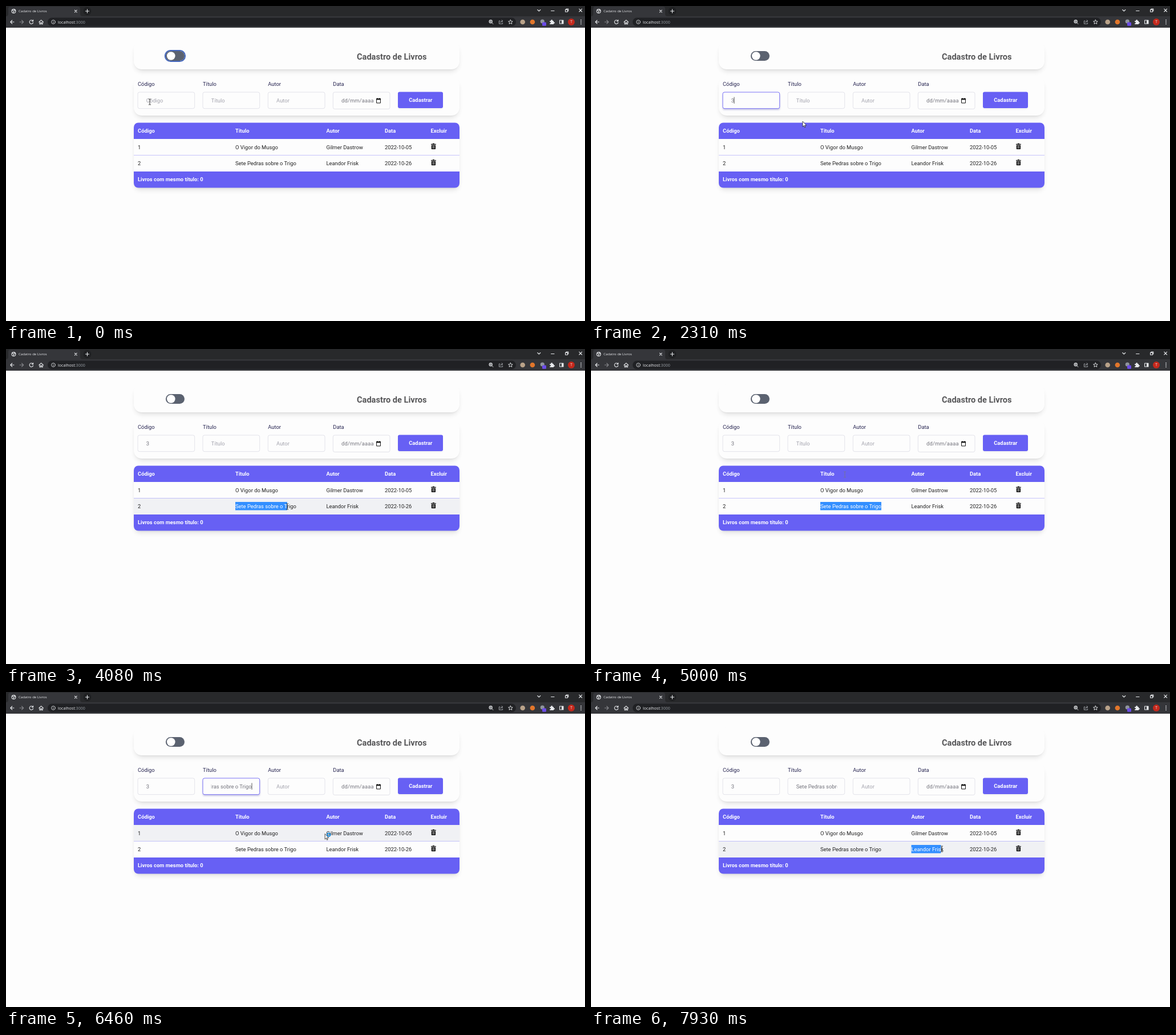
Write an HTML page that moves like this. It is 1015x552 px and loops after 8 s.

```html
<!DOCTYPE html>
<html lang="pt">
<head>
<meta charset="utf-8">
<title>Cadastro de Livros</title>
<style>
html, body { margin: 0; width: 100%; height: 100%; overflow: hidden; background: #fdfdfd; }
svg { display: block; width: 100%; height: 100%; }
text { font: 9.4px Roboto, sans-serif; fill: #222; white-space: pre; }
.ui { font-family: "Open Sans", "Noto Sans", sans-serif; fill: #e8eaed; }
.bold { font-weight: 700; }
.light { fill: #fff; }
.label { fill: #24224f; }
.hint { fill: #a3a3ad; }
.value { fill: #73737c; }
.line { fill: none; stroke: #e8eaed; stroke-width: 1.1; stroke-linecap: round; stroke-linejoin: round; }
.far { filter: blur(4.4px); fill: #000; opacity: .1; }
.near { filter: blur(1.7px); fill: #000; opacity: .05; }
.purple { fill: #6760f4; }
</style>
</head>
<body>
<svg id="stage" viewBox="0 0 1015 552" preserveAspectRatio="none"></svg>
<script>
const LOOP = 8000;
const TICK = 1000 / 13;
const COLS = [231, 402, 561.5, 664, 744.5];
const BOOKS = [
  ['1', 'O Vigor do Musgo', 'Gilmer Dastrow', '2022-10-05'],
  ['2', 'Sete Pedras sobre o Trigo', 'Leandor Frisk', '2022-10-26']
];
const PASTED = BOOKS[1][1];
const FIELDS = [['Código', 231], ['Título', 345], ['Autor', 459.3], ['Data', 573.3]];

const text = (x, y, s, cls = '', extra = '') =>
  `<text x="${x}" y="${y}" class="${cls}" ${extra}>${s}</text>`;
const rect = (x, y, w, h, r, attrs) =>
  `<rect x="${x}" y="${y}" width="${w}" height="${h}" rx="${r}" ${attrs}/>`;
const line = (d, attrs = '') => `<path class="line" d="${d}" ${attrs}/>`;
const dot = (x, y, r, fill) => `<circle cx="${x}" cy="${y}" r="${r}" fill="${fill}"/>`;

const shadow = (x, y, w, h, r) =>
  rect(x + 1.8, y + 7.7, w - 3.6, h - 3.6, r, 'class="far"') +
  rect(x + 1.2, y + 3.5, w - 2.4, h - 2.4, r, 'class="near"');

const card = (y, h) => shadow(224, y, 571, h, 14) + rect(224, y, 571, h, 14, 'fill="#fdfdfd"');

function browser() {
  return rect(0, 0, 1015, 18, 0, 'fill="#28292b"') +
    rect(0, 18, 1015, 20, 0, 'fill="#35363a"') +
    '<path d="M0 18Q4 18 4 14V5Q4 1 8 1H126Q130 1 130 5V14Q130 18 134 18Z" fill="#35363a"/>' +
    '<circle class="line" cx="13.5" cy="9" r="3.4"/>' +
    line('M11 7.4L14 8.4L13 11.6M14.5 6L16 8.5', 'stroke-width=".9"') +
    text(22, 11.3, 'Cadatro de Livros', 'ui', 'style="font-size:6.1px"') +
    line('M120.4 7.2L124.2 11M124.2 7.2L120.4 11') +
    dot(142.5, 9, 7, '#1f2022') +
    line('M139.4 9H145.6M142.5 5.9V12.1') +
    line('M931.8 6.5L934.3 9L936.8 6.5') +
    line('M955.6 8.5H961') +
    line('M980.6 6.4H984.4V10.2H980.6ZM982 6.2V5H985.8V8.8H984.6', 'stroke-width=".9"') +
    line('M1004.8 5.2L1009.6 10M1009.6 5.2L1004.8 10') +
    rect(73, 20.5, 821, 15, 7.5, 'fill="#202124"') +
    line('M14 28H8M10.8 25L7.8 28L10.8 31') +
    line('M24 28H30.4M27.6 25L30.6 28L27.6 31', 'style="stroke:#85868a"') +
    line('M47 26A3.3 3.3 0 1 0 47.6 29M47.6 24.4V26.8H45.2') +
    line('M57.8 28.2L61.6 24.6L65.4 28.2M59 27.4V31.6H60.8V29H62.4V31.6H64.2V27.4') +
    '<circle class="line" cx="83" cy="28" r="3.4" style="stroke-width:.8"/>' +
    line('M83 27.8V29.8M83 26.2V26.3', 'style="stroke-width:.8"') +
    text(91, 30.5, 'localhost<tspan fill="#9aa0a6">:3000</tspan>', 'ui', 'style="font-size:7.1px"') +
    '<circle class="line" cx="849.7" cy="27.2" r="2.6"/>' +
    line('M851.8 29.4L854 31.6M848.5 27.2H850.9M849.7 26V28.4', 'style="stroke-width:.9"') +
    line('M866 26H864.4V31.2H870.6V29.6M866.4 29Q867 26.4 870 26.4M869 24.6L871 26.4L869 28.2',
      'style="stroke-width:.8;stroke:#bdc1c6"') +
    line('M884.4 24.2L885.5 26.7L888.2 26.9L886.2 28.7L886.8 31.4L884.4 30L882 31.4L882.6 28.7L880.6 26.9L883.3 26.7Z',
      'style="stroke-width:.9"') +
    dot(905.7, 28, 4.3, '#b9a289') +
    dot(922.9, 28, 4.3, '#e2762b') +
    dot(940.3, 27, 3.6, '#8f949c') +
    rect(940, 28.6, 7, 6.2, 1.4, 'fill="#6b4be8"') +
    '<path d="M953.2 26H955.4A1.4 1.4 0 1 1 958 26H960V28.2A1.3 1.3 0 1 1 960 30.6V32H953.2V30.2A1.2 1.2 0 1 0 953.2 28Z" fill="#e8eaed"/>' +
    line('M970.6 25H977V31H970.6Z') + rect(974, 25, 3, 6, 0, 'fill="#e8eaed"') +
    dot(991, 28, 6, '#c5281c') +
    text(991, 30.4, 'T', 'ui', 'text-anchor="middle" style="font-size:6.5px"') +
    [24.7, 28, 31.3].map(y => dot(1008, y, .9, '#e8eaed')).join('');
}

function header() {
  return card(62, 49) +
    rect(279, 78, 35, 19, 9.5, 'id="ring" fill="none" stroke="#4467bd" stroke-width="2.2"') +
    rect(280, 79, 33, 17, 8.5, 'fill="#5b6270"') +
    dot(289.3, 87.5, 7.3, '#fff') +
    text(615, 94.2, 'Cadastro de Livros', 'bold', 'style="font-size:14.6px;fill:#565658"');
}

const field = ([name, x], i) =>
  text(x, 139.6, name, 'label') +
  rect(x, 154, 100, 28, 3, `id="glow${i}" fill="#3a35a0" opacity=".3" style="filter:blur(1.8px)"`) +
  rect(x, 151, 99.7, i === 3 ? 29.5 : 28.7, 3, `id="box${i}" fill="#fdfdfd"`) +
  (i < 3 ? text(x + 14.8, 168.8, name, 'hint', `id="hint${i}"`) : '');

function form() {
  return card(124, 68) + FIELDS.map(field).join('') +
    text(588, 169, 'dd/mm/aaaa', 'value', 'letter-spacing=".17"') +
    '<path d="M649.6 162.6H656.4V170H649.6Z" fill="none" stroke="#111" stroke-width="1"/>' +
    rect(649.2, 162, 7.6, 2.3, 0, 'fill="#111"') +
    rect(650.4, 161, 1, 1.6, 0, 'fill="#111"') + rect(654.6, 161, 1, 1.6, 0, 'fill="#111"') +
    text(245.8, 168.8, '3', 'value', 'id="code"') +
    `<g clip-path="url(#inner)">${text(359.8, 168.8, PASTED, 'value', 'id="name"')}</g>` +
    rect(0, 159.5, .8, 11.5, 0, 'id="caret" fill="#333"') +
    rect(687.5, 153, 78, 28, 3, 'class="near"') +
    rect(687, 150.5, 79, 28.5, 3, 'class="purple"') +
    text(726.8, 167.6, 'Cadastrar', 'bold light', 'text-anchor="middle"');
}

const trash = y =>
  `<g transform="translate(745 ${y})" fill="#151515">` +
  '<path d="M0 1H2.6L3.2 0H5.6L6.2 1H8.8V2.3H0ZM.7 3H8.1V9.2Q8.1 10.2 7.1 10.2H1.7Q.7 10.2 .7 9.2Z"/>' +
  '<path d="M2.9 4.2V8.8M4.4 4.2V8.8M5.9 4.2V8.8" stroke="#fff" stroke-width=".55"/></g>';

const row = (book, i) =>
  rect(224, 233 + i * 28.6, 571, 28.4, 0, `id="row${i}"`) +
  book.map((s, c) => text(COLS[c], 251 + i * 27.8, s, '', `id="cell${i}${c}"`)).join('') +
  trash(240.8 + i * 28.2);

function table() {
  const heads = ['Código', 'Título', 'Autor', 'Data', 'Excluir'];
  return shadow(224, 204.5, 571, 114, 8) +
    '<g clip-path="url(#table)">' +
    rect(224, 204, 571, 115, 0, 'class="purple"') +
    heads.map((s, c) => text(COLS[c], 222, s, 'bold light')).join('') +
    BOOKS.map(row).join('') +
    text(231, 307, 'Livros com mesmo título: 0', 'bold light') + '</g>' +
    rect(0, 268, 0, 14.5, 0, 'id="mark" fill="#338fff"') +
    '<g clip-path="url(#picked)">' +
    [1, 2].map(c => text(COLS[c], 278.8, BOOKS[1][c], 'light', `id="picked${c}"`)).join('') + '</g>';
}

const pointers =
  '<g id="arrow"><path d="M0 0V9.6L2.2 7.6L3.6 10.8L5 10.2L3.6 7.1H6.6Z" fill="#fff" stroke="#222" stroke-width=".8" stroke-linejoin="round"/>' +
  '<circle id="busy" cx="6.6" cy="1.6" r="2.8" fill="none" stroke="#1287d8" stroke-width="1.7"/></g>' +
  '<path id="beam" d="M-2 -5H-.5L0 -4.5L.5 -5H2M0 -4.5V4.5M-2 5H-.5L0 4.5L.5 5H2" fill="none" stroke-width=".9"/>';

const stage = document.getElementById('stage');
stage.innerHTML = '<defs>' +
  `<clipPath id="inner">${rect(359.8, 152, 71.4, 27, 0, '')}</clipPath>` +
  `<clipPath id="table">${rect(224, 204.5, 571, 114, 8, '')}</clipPath>` +
  `<clipPath id="picked">${rect(0, 268, 0, 14.5, 0, 'id="pick"')}</clipPath></defs>` +
  rect(0, 0, 1015, 552, 0, 'fill="#fdfdfd"') +
  header() + form() + table() + browser() + pointers;

const $ = id => document.getElementById(id);
const set = (id, attrs) => { for (const k in attrs) $(id).setAttribute(k, attrs[k]); };
const show = (id, on) => set(id, { visibility: on ? 'visible' : 'hidden' });
const within = (k, a, b) => k >= a && k < b;

// Pointer path: tick, x, y
const PATH = [
  [1, 252, 168], [2, 258, 167], [4, 275, 167], [23, 275, 167], [28, 347, 201],
  [30, 371, 202], [35, 388, 234], [40, 404, 274], [42, 404, 277], [44, 404, 277],
  [54, 503, 276], [56, 508, 275], [59, 508, 276], [62, 511, 277], [63, 511, 277],
  [64, 482, 250], [65, 445, 220], [69, 364, 168], [74, 385, 168], [78, 385, 168],
  [81, 555, 232], [89, 566, 276], [92, 565, 278], [94, 564, 277], [103, 615, 275]
];
const BEAMS = [[0, 25], [39, 62], [65, 66], [69, 79], [88, 200]];

function pointerAt(k) {
  const i = PATH.findIndex(p => p[0] >= k);
  if (i <= 0) return (i ? PATH[PATH.length - 1] : PATH[0]).slice(1);
  const [a, b] = [PATH[i - 1], PATH[i]];
  const u = (k - a[0]) / (b[0] - a[0]);
  return [a[1] + (b[1] - a[1]) * u, a[2] + (b[2] - a[2]) * u];
}

// Selection ends at the letter edge nearest to the pointer
function edgeNear(col, x) {
  const el = $('picked' + col);
  let best = COLS[col];
  for (let n = 0; n < el.getNumberOfChars(); n++) {
    const edge = el.getEndPositionOfChar(n).x;
    if (Math.abs(edge - x) < Math.abs(best - x)) best = edge;
  }
  return best;
}

function caretAt(k) {
  if (within(k, 17, 23)) return 245.6;
  if (within(k, 24, 31) || within(k, 37, 44)) return 250.6;
  if (within(k, 70, 77)) return 359.6;
  if (within(k, 79, 86)) return 430.6;
  return 0;
}

function draw(ms) {
  const k = Math.floor((ms + 8) / TICK);
  const [x, y] = pointerAt(k);
  const focus = within(k, 17, 44) ? 0 : within(k, 70, 94) ? 1 : -1;

  show('ring', k < 17);
  for (let i = 0; i < 4; i++) {
    show('glow' + i, i === focus);
    set('box' + i, { stroke: i === focus ? '#7a72f5' : '#e3e3ea', 'stroke-width': 1 });
  }
  show('hint0', k < 23);
  show('code', k >= 23);
  show('hint1', k < 79);
  show('name', k >= 79);
  set('name', focus === 1 ? { x: 430.6, 'text-anchor': 'end' } : { x: 359.8, 'text-anchor': 'start' });

  const caret = caretAt(k);
  show('caret', caret > 0);
  set('caret', { x: caret });

  BOOKS.forEach((b, i) => {
    const top = 233 + i * 28.6;
    set('row' + i, { fill: within(y, top, top + 28.4) ? '#f0f1f4' : '#fdfdfd' });
  });

  const col = within(k, 44, 70) ? 1 : k >= 94 ? 2 : 0;
  const end = col ? edgeNear(col, col === 1 && k >= 56 ? 600 : x) : 0;
  const span = { x: col ? COLS[col] : 0, width: col ? end - COLS[col] : 0 };
  set('mark', span);
  set('pick', span);
  show('picked1', col === 1);
  show('picked2', col === 2);

  const beam = BEAMS.some(([a, b]) => within(k, a, b));
  show('beam', beam);
  show('arrow', !beam);
  show('busy', !beam && within(k, 79, 87));
  set(beam ? 'beam' : 'arrow', { transform: `translate(${x} ${y})` });
  set('beam', { stroke: within(y, 204, 233) ? '#77748f' : '#222' });
}

const start = performance.now();
function frame() {
  draw((performance.now() - start) % LOOP);
  requestAnimationFrame(frame);
}
frame();
</script>
</body>
</html>
```
